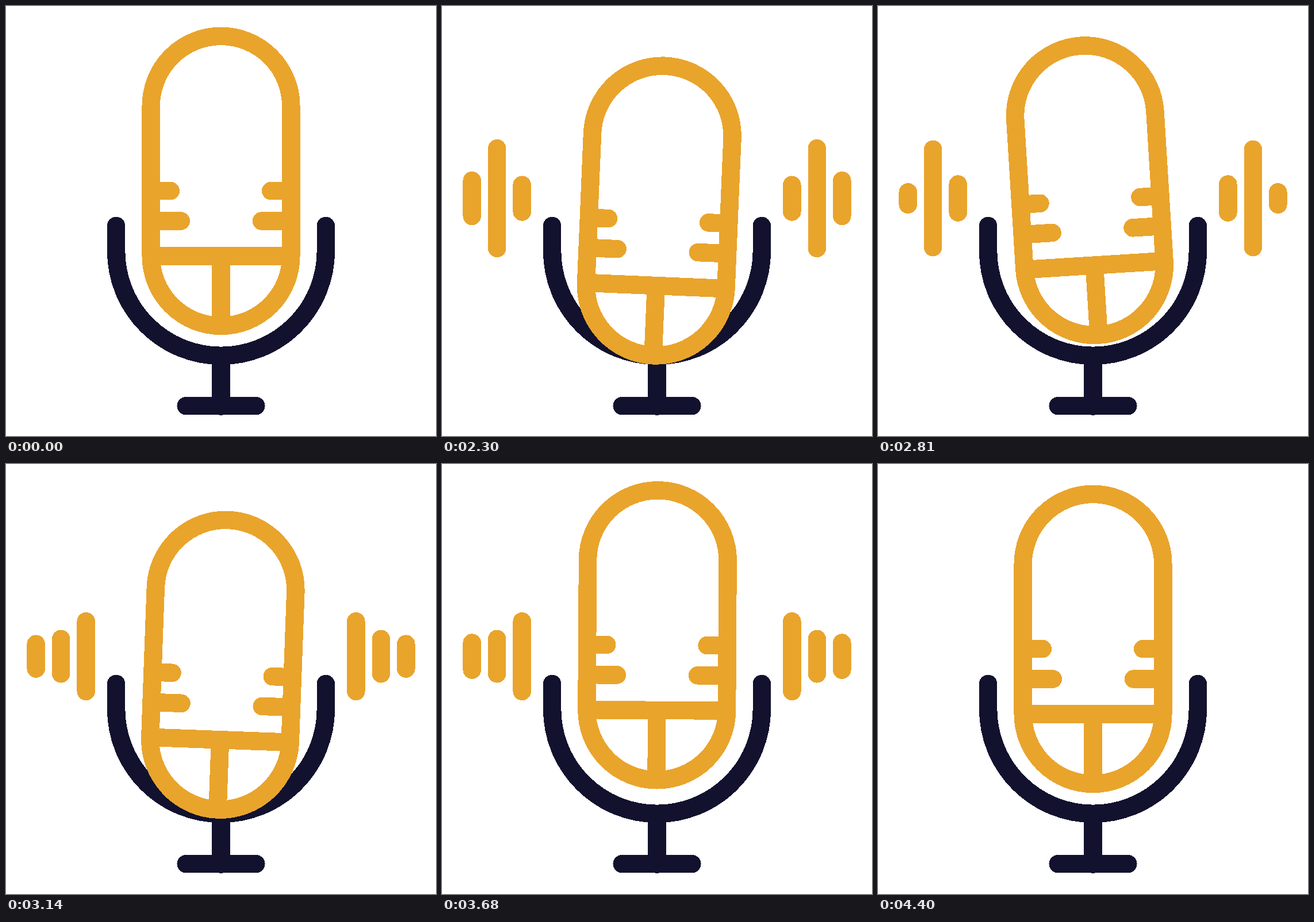
Write an HTML page that moves like this. It is 748 px wide and 748 px high and loops after 4.43 s.

```html
<!DOCTYPE html>
<html lang="en">
<head>
<meta charset="utf-8">
<title>Microphone</title>
<style>
  html, body { margin: 0; width: 100%; height: 100%; overflow: hidden; background: #fff; }
  svg { display: block; width: 100%; height: 100%; shape-rendering: crispEdges; }
  path, rect { fill: none; stroke-width: 31.5; stroke-linecap: round; }
  .gold { stroke: #e9a42c; }
  .navy { stroke: #12122f; }
</style>
</head>
<body>
<svg viewBox="0 0 748 748">
  <g class="navy">
    <path d="M191.6 382.5V426A182.4 182.4 0 0 0 556.4 426V382.5"/>
    <path d="M374 608.4V696M313.2 695.7H434.8"/>
  </g>
  <g class="gold" id="mic">
    <rect x="252.2" y="52.4" width="243.6" height="504" rx="121.8"/>
    <path d="M252.2 435H495.8M374 435V556.4"/>
    <path d="M252.2 321.6H286.3M252.2 374H304.2M495.8 321.6H460.7M495.8 374H444.5"/>
  </g>
  <path class="gold" id="waves"/>
</svg>
<script>
const LOOP = 4430, START = 2000, STEP = 30, LAST = 80;
const MID_X = 374, MID_Y = 334.6, PIVOT_Y = 395;
const BEAT = 9.4, WAVE_X = 278.3, GAP = 43.5;

const mic = document.getElementById("mic");
const waves = document.getElementById("waves");

// Sways between two extremes at the given turns, calms to `calm`, then rests at 0.
function swing(turns, first, odd, even, calm) {
  const end = turns.length - 1;
  const level = i =>
    i === 0 ? first : i >= end ? 0 : i === end - 1 ? calm : i % 2 ? odd : even;
  return step => {
    const next = turns.findIndex(t => t >= step);
    if (next < 0) return 0;
    const i = Math.max(next, 1);
    const p = (step - turns[i - 1]) / (turns[i] - turns[i - 1]);
    const ease = (1 - Math.cos(Math.PI * p)) / 2;
    return level(i - 1) + (level(i) - level(i - 1)) * ease;
  };
}

// Turns on every `stride`-th beat, starting with the first one.
function beats(stride) {
  const turns = [0];
  for (let n = 1; n <= 7; n += stride) turns.push(n * BEAT);
  return [...turns, LAST];
}

const drop = swing([0, 11, 20.8, 34, 52, 64.5, 77], 3, 52.6, -14, 17.8);
const tilt = swing([0, 4.5, 13.7, 26.5, 46.5, 61, 77], 0, -3.55, 5.6, -1.56);
const bars = [
  swing(beats(1), 14, 46, 122, 122),
  swing(beats(1), 22, 175, 60, 113),
  swing(beats(2), 6, 62, 21, 30)
];

function wavePath(step) {
  return bars.map((bar, i) => {
    const len = Math.max(bar(step), 0.01);
    const dist = WAVE_X + (i - 1) * GAP;
    return [-dist, dist].map(x => `M${MID_X + x} ${MID_Y - len / 2}v${len}`).join("");
  }).join("");
}

function draw(time) {
  const step = Math.floor((time % LOOP - START) / STEP);
  const active = step > 0 && step < LAST;
  const y = active ? drop(step) : 0;
  const angle = active ? tilt(step) : 0;
  mic.setAttribute("transform", `translate(0 ${y}) rotate(${angle} ${MID_X} ${PIVOT_Y})`);
  waves.setAttribute("d", active ? wavePath(step) : "");
}

let begin;
function tick(now) {
  begin ??= now;
  draw(now - begin);
  requestAnimationFrame(tick);
}
draw(0);
requestAnimationFrame(tick);
</script>
</body>
</html>
```
